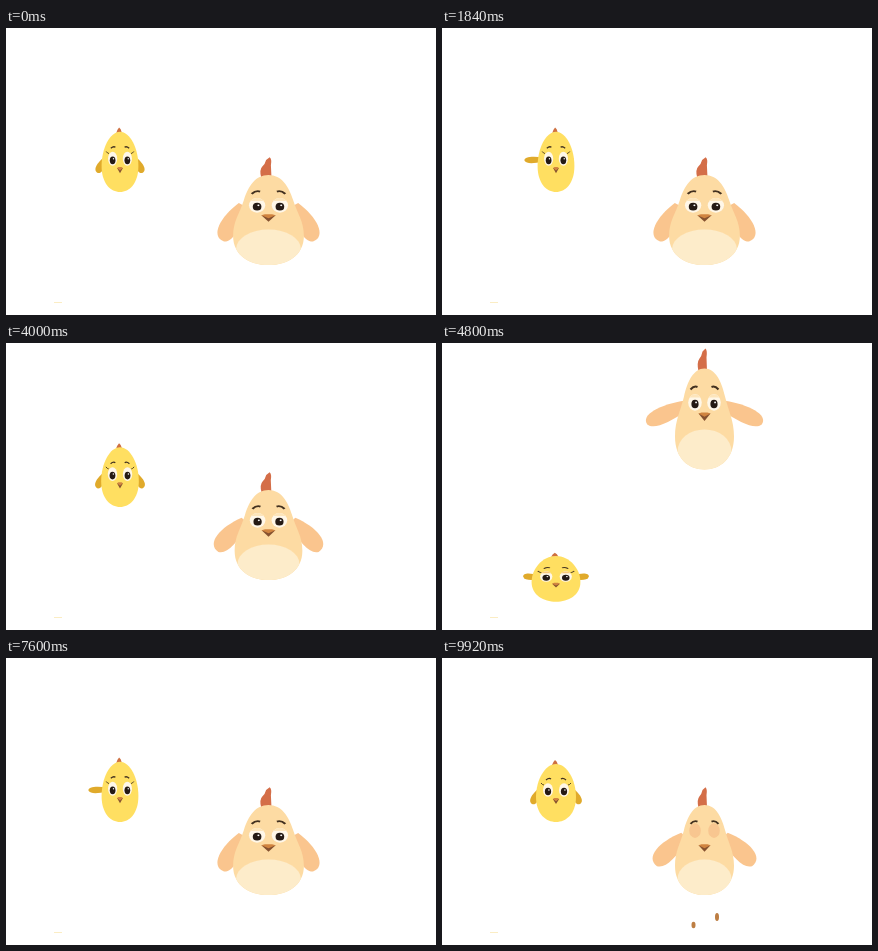
Animation of 430x287 px, one loop 10 s. Source, as an HTML page with a canvas:

```html
<!DOCTYPE html>
<html lang="en">
<head>
<meta charset="utf-8">
<title>Jumping hen and chick</title>
<style>
html, body { margin: 0; width: 100%; height: 100%; overflow: hidden; background: #fff; }
canvas { display: block; }
</style>
</head>
<body>
<canvas id="stage" width="430" height="287"></canvas>
<script>
const ctx = document.getElementById('stage').getContext('2d');
const LOOP = 10000, CYCLE = 1920, STEP = 80;
const SIDES = [-1, 1];

const progress = (t, start, end) => Math.min(1, Math.max(0, (t - start) / (end - start)));
const smooth = (t, start, end) => {
  const u = progress(t, start, end);
  return u * u * (3 - 2 * u);
};
// Rises to 1 over a..b and returns to 0 over c..d.
const pulse = (t, a, b, c, d) => smooth(t, a, b) - smooth(t, c, d);
const mix = (a, b, u) => a + (b - a) * u;

// Shared by both birds: a decelerating launch, and the pose while the hen stands.
const launch = t => 1 - (1 - progress(t, 320, 1040)) ** 2;
const standing = t => 1 - pulse(t, 80, 320, 1700, 1840);

const henBody = new Path2D('M0-101C11-101 17-88 20.5-73C24-58 29.5-49 29.5-33C29.5-11 16 0 0 0S-29.5-11-29.5-33C-29.5-49-24-58-20.5-73C-17-88-11-101 0-101Z');
const henComb = new Path2D('M-6-98Q-8-107-5-111Q-3-113-2-118L1-121Q3-119 2-112L2.5-98Z');
const chickBody = new Path2D('M0-58C11-58 20-42 20-25C20-8 10 0 0 0S-20-8-20-25C-20-42-11-58 0-58Z');
const chickComb = new Path2D('M-4-57Q-3-60-1-62Q1-61 2-57Z');

function fill(color, path) {
  ctx.fillStyle = color;
  ctx.fill(path);
}

function ellipse(x, y, rx, ry, color) {
  const path = new Path2D();
  path.ellipse(x, y, rx, ry, 0, 0, 2 * Math.PI);
  fill(color, path);
}

function brow(x0, y0, cx, cy, x1, y1, width) {
  ctx.beginPath();
  ctx.moveTo(x0, y0);
  ctx.quadraticCurveTo(cx, cy, x1, y1);
  ctx.lineWidth = width;
  ctx.strokeStyle = '#42301f';
  ctx.stroke();
}

function placed(x, y, sx, sy, draw) {
  ctx.save();
  ctx.translate(x, y);
  ctx.scale(sx, sy);
  draw();
  ctx.restore();
}

// A leaf that is straight when spread and bulges outwards when folded.
function wing(x, y, side, size, angle, length, spread, color) {
  placed(x, y, side * size, size, () => {
    ctx.rotate(angle * Math.PI / 180);
    const back = mix(15, 8, spread);
    fill(color, new Path2D(`M-5-5C${length * .45} ${-back} ${length * 1.05} ${-back} ${length} 0
      C${length * .9} 8 ${length * .5} 8-5 5Z`));
  });
}

// lid: 0 is open, 1 is shut
function eye(x, y, rx, ry, pupil, lid, lidColor) {
  if (lid === 1) {
    ellipse(x, y - ry * .65, rx * .85, ry, lidColor);
    return;
  }
  ellipse(x, y, rx, ry, '#fff7e8');
  ellipse(x, y + 1.5, pupil, pupil * 1.2, '#251a14');
  ellipse(x + pupil * .3, y, pupil * .25, pupil * .25, '#fff');
  ctx.save();
  ctx.beginPath();
  ctx.rect(x - rx, y - ry, 2 * rx, 2 * ry * lid);
  ctx.clip();
  ellipse(x, y, rx, ry, lidColor);
  ctx.restore();
}

function beak(y, w, h) {
  fill('#85512f', new Path2D(`M${-w} ${y}H${w}L0 ${y + h}Z`));
  fill('#d08440', new Path2D(`M${-w} ${y}L${-w / 2} ${y - 1}H${w / 2}L${w} ${y}L0 ${y + h * .45}Z`));
}

function drawHen(t) {
  const lift = launch(t) - progress(t, 1240, 1806) ** 2;
  const spread = pulse(t, 720, 1240, 1400, 1800);
  const swing = Math.sin(2 * Math.PI * progress(t, 0, 1040)) * (1 - spread);
  const angle = 62 - 90 * spread - 16 * swing;
  const takingOff = t >= 240 && t <= 400;
  const x = 262.5, y = mix(237, 125, lift);
  const sx = 1 + .2 * standing(t), sy = mix(.89, 1, lift);

  for (const side of SIDES)
    wing(x + side * 23 * sx, y - 62 * sy, side, 1, angle, mix(36, 41, spread), spread, '#fac58e');
  placed(x, y, sx, sy, () => {
    fill('#d46e48', henComb);
    fill('#fddba3', henBody);
    ctx.save();
    ctx.clip(henBody);
    ellipse(0, -18, 27, 22, '#fdecca');
    ctx.restore();
    for (const side of SIDES) {
      eye(side * 9.5, -67, 6.8, 8.2, 3.6, takingOff ? 1 : .2, takingOff ? '#f8c690' : '#fde5bb');
      brow(side * 7, -82.5, side * 10.5, -84, side * 14, -80, 2);
    }
    beak(-56, 6, 7.5);
  });
  if (takingOff) {
    ellipse(251.5, y + 30, 2, 3.3, '#bd7e43');
    ellipse(275, y + 22, 2, 4, '#bd7e43');
  }
}

function drawChick(t) {
  const drop = launch(t) - smooth(t, 1040, 1720);
  const squash = pulse(t, 760, 960, 960, 1520);
  const spread = pulse(t, 700, 1100, 1300, 1700);
  const wave = pulse(t, 1600, 1760, 1840, 1920);
  const lid = t >= 1120 && t <= 1280 ? 1 : .2 * squash;
  const x = 114, y = mix(164, 260, drop);
  const sx = 1 - .08 * standing(t) + .22 * squash ** 3;
  const sy = 1 + .04 * standing(t) - .21 * squash;

  // The left wing waves while the right one hides behind the body.
  for (const side of SIDES) {
    const open = side < 0 ? Math.max(spread, .65 * wave) : spread;
    const angle = 62 - 90 * open + (side > 0 ? 45 * wave : 0);
    const length = mix(36, 30, spread) + (side < 0 ? 4 * wave : 0);
    wing(x + side * 16 * sx, y - 31 * sy, side, .42, angle, length, open, '#e0aa2b');
  }
  placed(x, y, sx, sy, () => {
    fill('#ce7040', chickComb);
    fill('#ffdf61', chickBody);
    for (const side of SIDES) {
      eye(side * 8, -32, 5, 6.7, 3.1, lid, '#fbc978');
      brow(side * 5, -43, side * 7, -44.5, side * 10, -42, 1.3);
      brow(side * 12, -37, side * 13.5, -37, side * 15, -39, .9);
    }
    beak(-23, 3.2, 5);
  });
}

function frame() {
  const clock = performance.now() % LOOP;
  const t = Math.floor(clock / STEP) * STEP % CYCLE;
  ctx.fillStyle = '#fff';
  ctx.fillRect(0, 0, 430, 287);
  ctx.fillStyle = '#fbedc4';
  ctx.fillRect(48, 274, 8, 1);
  drawChick(t);
  drawHen(t);
  requestAnimationFrame(frame);
}
frame();
</script>
</body>
</html>
```
